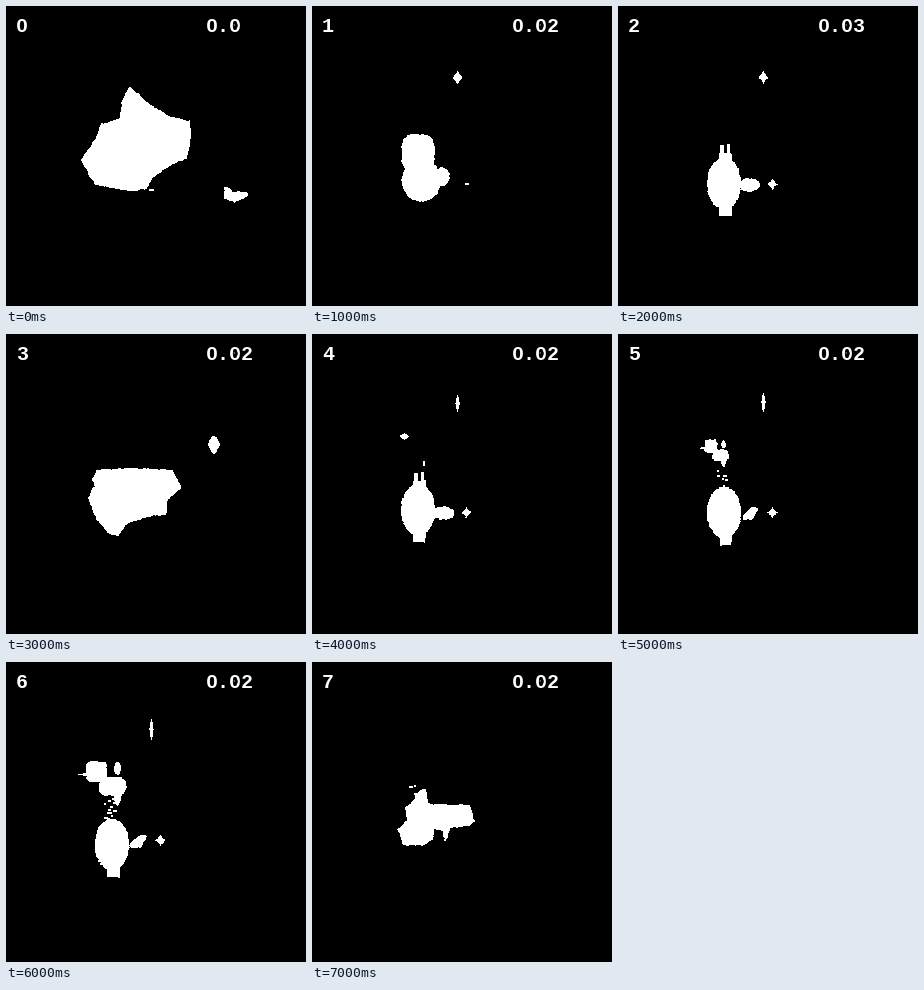
Recreate the animation shown at these times as a matplotlib script. Size 300x300 px, loop 8 s.

```python
import numpy as np
import matplotlib.pyplot as plt
from matplotlib.animation import FuncAnimation
from matplotlib.patches import Ellipse, Polygon

SIZE = 300
CHAR = 12
READINGS = ["0.0", "0.02", "0.03"] + ["0.02"] * 5


def oval(x, y, rx, ry, p=2):
    """Superellipse: p below 1 is a star, 1 a diamond, above 2 boxy."""
    t = np.linspace(0, 2 * np.pi, max(16, int(3 * (rx + ry))), endpoint=False)
    c, s = np.cos(t), np.sin(t)
    return np.column_stack([x + rx * np.sign(c) * abs(c) ** (2 / p),
                            y + ry * np.sign(s) * abs(s) ** (2 / p)])


def box(x, y, w, h):
    return np.array([(x, y), (x + w, y), (x + w, y + h), (x, y + h)], float)


def outline(*keys):
    """Closed line through a few key points, split into short steps."""
    pts = np.array(keys, float)
    out = []
    for a, b in zip(pts, np.roll(pts, -1, axis=0)):
        steps = max(1, int(np.hypot(*(b - a)) / 2))
        out += [a + (b - a) * k / steps for k in range(steps)]
    return np.array(out)


def specks(seed, n, x, y, w, h):
    rng = np.random.default_rng(seed)
    return [box(x + int(rng.integers(w)), y + int(rng.integers(h)),
                int(rng.integers(1, 4)), 1) for _ in range(n)]


def body(bottom):
    return [oval(105.5, bottom - 32, 16.5, 25),
            box(101.5, bottom - 20, 11, 20)]


def horns():
    return [box(101, 147, 12, 10), box(102, 139, 3, 10), box(109, 138, 2, 10)]


def head(scale):
    def part(dx, dy, rx, ry, p):
        return oval(96 + dx * scale, 116 + dy * scale,
                    rx * scale, ry * scale, p)
    return [part(-6, -7, 10, 10, 4), part(10, 8, 13, 9, 3),
            part(-14, -4, 10, 1, 1), part(15, -10, 3, 6, 1.5),
            part(15, 18, 3, 9, 1.5)]


def sliver(y, h):
    return oval(145, y, 1.6, h, 1)


DROP = oval(154, 178, 4.5, 5, 0.7)
STAR = oval(145, 71, 4, 6, 0.8)
NEAR_ARM = oval(131, 178.5, 10, 6)
FAR_ARM = outline((124, 182), (134, 173), (140, 174), (134, 184), (125, 185))

peak = outline((123, 81), (141, 97), (164, 111), (183, 115), (184, 130),
               (180, 151), (163, 159), (145, 171), (140, 182), (124, 184),
               (89, 178), (75, 154), (89, 133), (95, 118), (114, 112),
               (116, 94))
fish = outline((219, 180), (226, 186), (241, 186), (240, 190), (228, 195),
               (218, 192))
bean = [oval(105.5, 147, 16, 19, 3), oval(109, 174, 19, 20.5),
        oval(130, 170, 6.5, 8.5)]
low = outline((91, 136), (123, 134), (166, 136), (174, 153), (160, 166),
              (159, 180), (145, 181), (121, 188), (111, 201), (102, 198),
              (91, 185), (82, 164), (89, 150), (86, 145))
tail = outline((108, 128), (113, 126), (115, 142), (157, 143), (161, 158),
               (157, 163), (137, 165), (133, 178), (130, 168), (121, 166),
               (120, 176), (111, 182), (91, 182), (86, 168), (95, 158),
               (93, 146), (100, 140))

SCENES = [
    [peak, fish, box(143, 183, 4, 1)],
    bean + [STAR, box(153, 177, 3, 1)],
    body(209) + horns() + [NEAR_ARM, STAR, DROP],
    [low, oval(207.5, 110, 5.5, 8.5, 1.2)],
    body(207) + horns() + [NEAR_ARM, DROP, sliver(69, 8),
                           oval(92, 102, 4, 2.5, 1), box(111, 127, 1, 4)],
    body(210) + head(0.6) + [FAR_ARM, DROP, sliver(68, 9)]
    + specks(5, 8, 99, 136, 10, 20),
    body(214) + head(1) + [FAR_ARM, DROP, sliver(67, 10)]
    + specks(6, 12, 98, 136, 10, 22),
    [tail] + specks(7, 4, 94, 118, 10, 24),
]

fig = plt.figure(figsize=(3, 3), dpi=100, facecolor="black")
ax = fig.add_axes([0, 0, 1, 1])


def write(x, text):
    ax.text(x, 25.5, text, color="white", family="Liberation Mono",
            weight="bold", size=14.4, va="baseline")
    # The zeros are open, so cover their centre dots
    for k, c in enumerate(text):
        if c == "0":
            ax.add_patch(Ellipse((x + CHAR * (k + 0.5), 19), 3.4, 5.5,
                                 color="black", lw=0, zorder=5))


def fill(pts, rng):
    rough = min(0.7, 0.06 * np.ptp(pts, axis=0).min())
    pts = pts + rng.uniform(-rough, rough, pts.shape)
    ax.add_patch(Polygon(pts, closed=True, fc="white", lw=0,
                         antialiased=False))


def draw(i):
    ax.clear()
    ax.set_xlim(-0.5, SIZE - 0.5)
    ax.set_ylim(SIZE - 0.5, -0.5)
    ax.axis("off")
    rng = np.random.default_rng(i)
    for pts in SCENES[i]:
        fill(pts, rng)
    write(9.5, str(i))
    write(199.5, READINGS[i])
    return []


anim = FuncAnimation(fig, draw, frames=len(SCENES), interval=1000,
                     init_func=lambda: [], repeat=True, repeat_delay=0)
plt.show()
```
